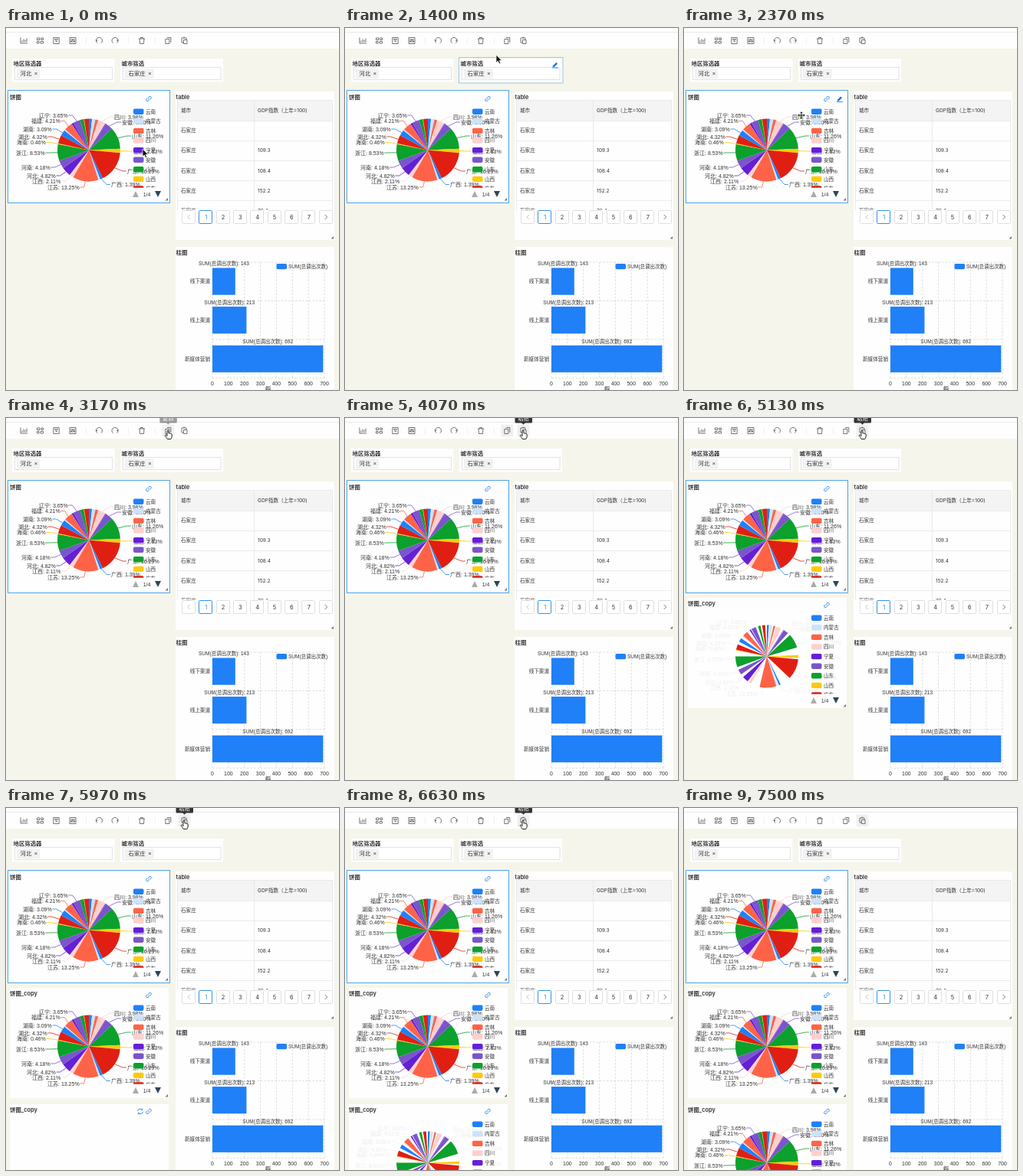
Animation of 434x473 px, one loop 7.53 s. Source, as an HTML page:

```html
<!DOCTYPE html>
<html lang="zh">
<head>
<meta charset="utf-8">
<style>
html, body { margin: 0; width: 100%; height: 100%; overflow: hidden; background: #f5f5ec; }
svg { display: block; width: 434px; height: 473px; font-family: "Liberation Sans", "Noto Sans CJK SC", "Noto Sans CJK", sans-serif; }
.ui { font-family: Inter, "Noto Sans CJK SC", "Noto Sans CJK", sans-serif; }
.icon { fill: none; stroke: #5c5c5c; stroke-width: .85; }
.blue { stroke: #2080e8; }
</style>
</head>
<body>
<svg id="stage" viewBox="0 0 434 473"></svg>
<script>
const LOOP = 7530, BLUE = '#2080f7';
const stage = document.getElementById('stage');
const $ = id => document.getElementById(id);
const clamp = v => Math.max(0, Math.min(1, v));

// Markup helpers; text is centred vertically on y.
const rect = (x, y, w, h, fill, extra = '') =>
  `<rect x="${x}" y="${y}" width="${w}" height="${h}" fill="${fill}" ${extra}/>`;
const text = (x, y, s, size = 6.6, extra = '') =>
  `<text x="${x}" y="${y + size * .36}" font-size="${size}" fill="#333" ${extra}>${s}</text>`;
const title = (x, y, s) => text(x, y, s, 7.4, 'class="ui" font-weight="600"');
const path = (d, extra = 'class="icon"') => `<path d="${d}" ${extra}/>`;
const at = (x, y, body, extra = '') => `<g transform="translate(${x} ${y})" ${extra}>${body}</g>`;
const line = (d, color = '#e6e6e6', extra = '') => path(d, `fill="none" stroke="${color}" stroke-width=".8" ${extra}`);
const middle = 'text-anchor="middle"';

// Icons are drawn around their own centre.
const glyphs = {
  chart: 'M-4.5-4V3.5H4.5M-2.5 2V0M-.5 2V-2M1.5 2V-1M3.5 2V-3',
  grid: 'M-4-3.5H-.5V-1H-4ZM1.5-3.5H4V-1H1.5ZM-4 1H-1.5V3.5H-4ZM.5 1H4V3.5H.5Z',
  doc: 'M-3.7-4H3.7V4H-3.7ZM-2-2H2L.7 0V1.5L-.7 .8V0Z',
  sliders: 'M-4-4H4V4H-4ZM-2-2.5V2.5M0-2.5V2.5M2-2.5V2.5M-3 1H-1M-1-1H1M1 1H3',
  undo: 'M-2.4 3.2A4 4 0 1 1 2.4 3.2M-4.3-1.5L-3.7.5L-2-.6',
  redo: 'M2.4 3.2A4 4 0 1 0-2.4 3.2M4.3-1.5L3.7.5L2-.6',
  trash: 'M-4-2.5H4M-1.5-2.5V-4H1.5V-2.5M-3-2.5L-2.5 4H2.5L3-2.5',
  copy: 'M-3.5-2V4H1.5V-2ZM-1.5-4H3.5V2.5',
  paste: 'M-1-1H3.5V4H-1ZM-1 2.5H-3.5V-3.5H2.5V-1M-1.5-4.3H.8',
  link: 'M-.8-1.4L1-3A1.7 1.7 0 0 1 3.2-.7L1.5 1M.8 1.4L-1 3A1.7 1.7 0 0 1-3.2.7L-1.5-1M-1 1L1-1',
  refresh: 'M-3.4-.4A3.4 3.4 0 0 1 2.6-2.2M3.4.4A3.4 3.4 0 0 1-2.6 2.2M2.8-3.6V-2H1.2M-2.8 3.6V2H-1.2'
};
const icon = (name, x, y, cls = '') => at(x, y, path(glyphs[name], `class="icon ${cls}"`));
const pencil = (x, y, id) => at(x, y,
  path('M-3 1.3L1.3-3L3-1.3L-1.3 3L-3.3 3.2Z', 'fill="#1677e8"') + line('M-4 4H4', '#1677e8'), `id="${id}"`);
const corner = (x, y) => path(`M${x} ${y}v-3.5l-3.5 3.5z`, 'fill="#777"');

// Pie data
const palette = [BLUE, '#cde2fb', '#ff6347', '#fdd0cf', '#651fd5', '#7a55cb', '#0ca02c', '#fdca0b', '#e01f12'];
const shares = [1.6, 1.75, 1.5, 3.98, .35, 3.9, 11.26, 2.13, 16.29, 1.39, .95, 13.25, 2.11, 4.82,
  4.18, 8.53, .46, 4.32, 3.09, .6, 4.21, .07, 1.1, 3.65, 1.9, .2, 2.4];
const total = shares.reduce((a, b) => a + b);
const color = i => palette[i % 9];
const CX = 108, CY = 159.5, R = 41;
const rim = a => [CX + R * Math.sin(a), CY - R * Math.cos(a)].map(v => v.toFixed(2)).join(' ');
let sum = 0;
const slices = shares.map(v => {
  const start = sum / total * 2 * Math.PI;
  sum += v;
  return { start, sweep: v / total * 2 * Math.PI };
});
const sector = ({ start, sweep }, p) =>
  `M${CX} ${CY}L${rim(start)}A${R} ${R} 0 0 1 ${rim(start + sweep * p)}Z`;

// slice, x, y, label
const labels = [
  [3, 141, 116, '四川: 3.98%'], [5, 151, 123, '安徽: 3.90%'], [6, 164, 141, '山东: 11.26%'],
  [7, 166, 161, '山西: 2.13%'], [8, 158, 187, '广东: 16.29%'], [9, 137, 204.5, '广西: 1.39%'],
  [11, 54, 208, '江苏: 13.25%'], [12, 34, 200, '江西: 2.11%'], [13, 27, 193, '河北: 4.82%'],
  [14, 20, 182, '河南: 4.18%'], [15, 13, 163, '浙江: 8.53%'], [16, 14, 149.5, '海南: 0.46%'],
  [17, 16, 142, '湖北: 4.32%'], [18, 22, 132, '湖南: 3.09%'], [20, 33, 121.5, '福建: 4.21%'],
  [23, 43, 114, '辽宁: 3.65%']
];
const label = ([i, x, y, s]) => {
  const { start, sweep } = slices[i], left = x < CX;
  const end = left ? x + (s.length > 9 ? 42.5 : 38.5) : x - 1;
  return line(`M${rim(start + sweep / 2)}L${end + (left ? 5 : -5)} ${y}H${end}`, color(i)) + text(x, y, s, 7);
};

const regions = ['云南', '内蒙古', '吉林', '四川', '宁夏', '安徽', '山东', '山西', '广东'];
const legend = regions.map((s, i) => {
  const y = 109.2 + i * 12.6;
  return rect(166, y - 3.7, 13.5, 7.4, palette[i], 'rx="1.8"') + text(182, y, s, 6.6);
}).join('');

const pie = n => `<g id="pie${n}"><g>${slices.map((s, i) => path(sector(s, 1), `fill="${color(i)}"`)).join('')}</g>
  <g id="labels${n}">${labels.map(label).join('')}</g>
  <g clip-path="url(#legendClip)">${legend}</g>
  ${path('M165 221L169 213L173 221Z', 'fill="#aaa"')}${path('M194 213H202L198 221Z', 'fill="#2f4554"')}
  ${text(183.5, 217, '1/4', 7, middle)}</g>`;

const pieCard = n => at(0, n * 152,
  (n ? rect(5, 83, 207, 144, '#fefefe') : rect(2.5, 81.5, 211, 147, '#fefefe', 'stroke="#4fa5e8"')) +
  title(5, 90.7, n ? '饼图_copy' : '饼图') + icon('link', 186, 92.5, 'blue') +
  (n ? at(0, 0, icon('refresh', 175, 92.5, 'blue'), `id="refresh${n}"`) : pencil(203, 92.5, 'editPie')) +
  pie(n) + corner(211, 225.5), `id="card${n}"`);

const filter = (x, w, name, value, tagW) =>
  rect(x, 40, w, 30.5, '#fefefe') + title(x + 1.5, 46.7, name) +
  rect(x + 3.5, 51.5, w - 6.5, 16, '#fff', 'stroke="#dadae2" stroke-width=".8"') +
  rect(x + 6.5, 54, tagW, 11.5, '#f3f3f3', 'stroke="#e6e6e6" stroke-width=".6" rx="1"') +
  text(x + 10.5, 59.5, value, 7.4, 'class="ui"') + text(x + tagW + 2, 59.5, '×', 7.5, middle);

function table() {
  let s = rect(221, 83, 207, 194, '#fefefe') + title(221.5, 90.7, 'table') +
    rect(223, 94.5, 202.5, 26.5, '#f4f4f5') + '<g clip-path="url(#tableClip)" class="ui">' +
    text(228, 108, '城市') + text(328, 108, 'GDP指数（上年=100)');
  ['', '109.3', '108.4', '152.2', '79.4'].forEach((v, i) => {
    const y = 134 + i * 26.1;
    s += text(228, y, '石家庄') + text(328, y, v);
  });
  for (let i = 0; i < 5; i++) s += line(`M223 ${121.5 + i * 26}H425.5`);
  s += line('M223 94.5H425.5V240M223.5 94.5V240M323.5 94.5V240') + '</g>';
  ['', 1, 2, 3, 4, 5, 6, 7, ''].forEach((v, i) => {
    const x = 238.3 + i * 22.35, on = v === 1;
    s += rect(Math.floor(x) - 8.5, 238.5, 17, 17, '#fff', `rx="1.2" stroke="${on ? '#1c86e8' : '#dcdcdc'}" stroke-width=".9"`);
    s += v ? `<g class="ui">${text(x, 247, v, 7.4, middle + (on ? ' style="fill:#1c86e8"' : ''))}</g>`
      : line(i ? `M${x - 1.5} 244l3 3l-3 3` : `M${x + 1.5} 244l-3 3l3 3`, i ? '#555' : '#bbb');
  });
  return s + corner(427, 275.5);
}

function bars() {
  const x0 = 269, unit = 146 / 700, dash = 'stroke-dasharray="2.5 2"';
  let s = rect(221, 286, 207, 187, '#fefefe') + title(221.5, 293, '柱图');
  for (let i = 0; i < 8; i++) {
    const x = x0 + i * 100 * unit;
    s += line(`M${x} 306V457.5`, '#d4d4d4', dash) + text(x, 464.5, i * 100, 6.9, middle);
  }
  for (let i = 0; i < 4; i++) s += line(`M${x0} ${306 + i * 50.5}H415`, '#d4d4d4', dash);
  [['线下渠道', 143], ['线上渠道', 213], ['新媒体营销', 692]].forEach(([name, v], i) => {
    const y = 313.5 + i * 50.6;
    s += rect(x0, y, v * unit, 35.2, BLUE) + text(266, y + 17.6, name, 6.6, 'text-anchor="end"') +
      text(x0 + v * unit / 2, y - 5.5, `SUM(总调出次数): ${v}`, 6.5, middle);
  });
  return s + rect(352.5, 308, 13.5, 7.3, BLUE, 'rx="1.8"') + text(368, 311.8, 'SUM(总调出次数)', 6.5) +
    text(0, 0, '数', 6.5, middle + ' transform="translate(342 470.5) rotate(-90)"');
}

const tip = (id, x, s) => at(x, 0, rect(-11, -9, 22.5, 15.5, '#333', 'rx="1.5"') +
  path('M-2.5 6H2.5L0 8.8Z', 'fill="#333"') + text(0, 0, s, 7.2, middle + ' style="fill:#fff"'), `id="${id}"`);
const buttonBack = (id, x) => rect(x - 8, 8.5, 16, 16, '#f0f0f0', `id="${id}" rx="1.5"`);

stage.innerHTML = `<clipPath id="legendClip">${rect(160, 103, 52, 105.8, '#000')}</clipPath>
  <clipPath id="tableClip">${rect(222, 94, 204, 143.5, '#000')}</clipPath>` +
  rect(0, 0, 434, 473, '#f5f5ec') + rect(0, 0, 434, 27, '#fefefe') + line('M0 5.5H434', '#e2e2e2') +
  line('M104.5 12V21M159.5 12V21M194.5 12V21', '#ececec') +
  buttonBack('copyBack', 211.3) + buttonBack('pasteBack', 232.5) +
  ['chart', 'grid', 'doc', 'sliders', 'undo', 'redo', 'trash', 'copy', 'paste']
    .map((n, i) => icon(n, [23.5, 44.5, 65.5, 87, 121.5, 142, 177, 211.3, 232.5][i], 16.5)).join('') +
  filter(8, 133.5, '地区筛选器', '河北', 29) + filter(149, 134, '城市筛选', '石家庄', 36.5) +
  `<g id="editFilter">${rect(148.5, 38.5, 135.5, 33.5, 'none', 'stroke="#9cc8ee"')}${pencil(274, 48, '')}</g>` +
  table() + bars() + pieCard(0) + pieCard(1) + pieCard(2) +
  tip('copyTip', 211.3, '复制') + tip('pasteTip', 232.5, '粘贴') +
  `<g id="cursor">
    ${path('M0 0V10L2.3 8L4 11.6L5.7 10.8L4.1 7.3H7.2Z', 'id="arrow" fill="#111" stroke="#fff" stroke-width=".7"')}
    ${path('M0-5L2-2.7H.7V-.7H2.7V-2L5 0L2.7 2V.7H.7V2.7H2L0 5L-2 2.7H-.7V.7H-2.7V2L-5 0L-2.7-2V-.7H-.7V-2.7H-2Z', 'id="cross" fill="#111" stroke="#fff" stroke-width=".4"')}
    ${path('M-1-3Q0-4.4 1-3V0Q2-.8 2.6.3Q3.7-.4 4.1.8Q5.2.4 5.2 1.8V4Q5 6 3.8 7.5H-.8Q-1.8 5.5-3.6 3.6Q-4.2 2-2.7 2.1L-1 3.6Z', 'id="hand" fill="#fff" stroke="#111" stroke-width=".9"')}
  </g>`;

// time, x, y of the pointer
const track = [[0, 178, 158], [450, 178, 158], [800, 188, 128], [1250, 197, 36], [1450, 197, 35],
  [1700, 190, 45], [2250, 153, 114], [2550, 153, 114], [3050, 211, 20], [3650, 211, 20],
  [3900, 232, 20], [7100, 232, 20], [7400, 237, -16], [LOOP, 237, -16]];
function pointer(t) {
  const i = track.findIndex(k => k[0] > t);
  const [a, ax, ay] = track[i - 1], [b, bx, by] = track[i];
  const u = (t - a) / (b - a), e = u * u * (3 - 2 * u);
  return [ax + (bx - ax) * e, ay + (by - ay) * e];
}

const fade = (id, v) => { $(id).style.opacity = v; };
const show = (id, on) => { $(id).style.display = on ? '' : 'none'; };

// Every slice opens from its own starting edge.
function growPie(n, t, cardAt, pieAt) {
  show('card' + n, t >= cardAt);
  show('refresh' + n, t < pieAt);
  show('pie' + n, t >= pieAt);
  const p = 1 - (1 - clamp((t - pieAt) / 1000)) ** 3;
  [...$('pie' + n).firstElementChild.children].forEach((el, i) => el.setAttribute('d', sector(slices[i], p)));
  fade('labels' + n, clamp((t - pieAt - 255) / 500));
}

function draw(now) {
  const t = now % LOOP, [x, y] = pointer(t);
  const inPie = x > 3 && x < 214 && y > 82 && y < 229 && t > 100;
  const onTool = y > 8 && y < 27 && x > 203;
  const onPaste = onTool && x > 222;
  $('cursor').setAttribute('transform', `translate(${x} ${y})`);
  show('hand', onTool);
  show('cross', inPie && t > 450);
  show('arrow', !onTool && !(inPie && t > 450));
  show('editPie', inPie);
  show('editFilter', x > 149 && x < 284 && y > 33 && y < 72);
  show('copyBack', onTool && !onPaste || t > 3400 && t < 4250);
  show('pasteBack', onPaste || t > 4250);
  fade('copyTip', clamp((t - 3100) / 150) * clamp((3880 - t) / 120));
  fade('pasteTip', clamp((t - 3850) / 150) * clamp((7350 - t) / 150));
  growPie(1, t, 4350, 4835);
  growPie(2, t, 5850, 6335);
}

const begin = performance.now();
function tick() {
  draw(performance.now() - begin);
  requestAnimationFrame(tick);
}
tick();
</script>
</body>
</html>
```
